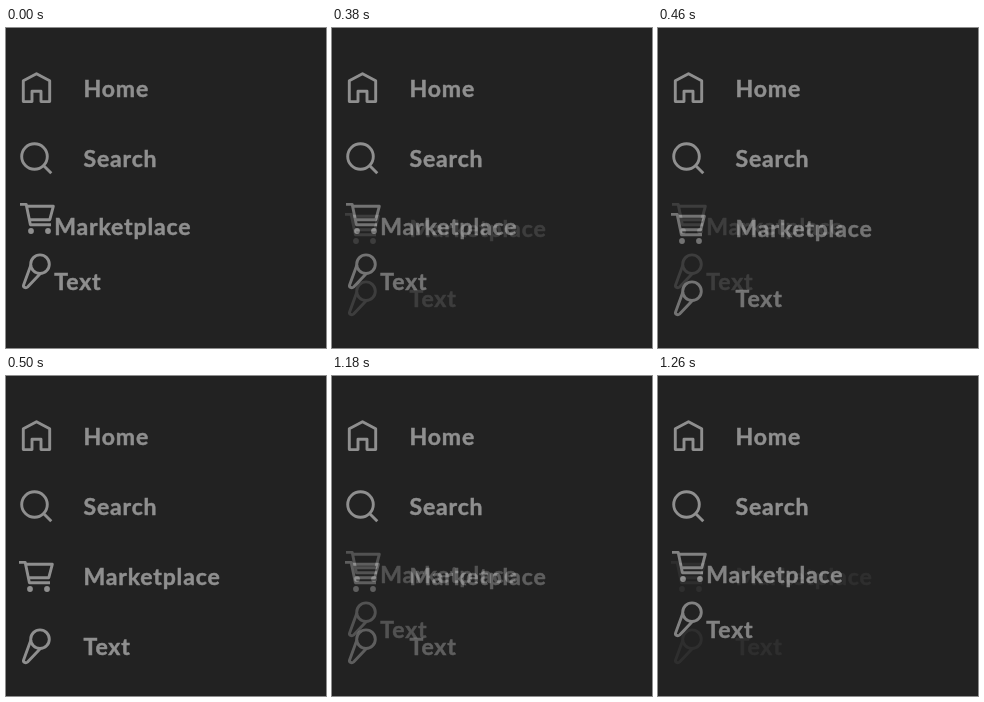
An HTML page that plays this animation: 320 by 320 pixels, repeating every 1280 ms.

```html
<!DOCTYPE html>
<html lang="en">
<head>
<meta charset="utf-8">
<title>Menu alignment</title>
<style>
  html, body { margin: 0; width: 100%; height: 100%; overflow: hidden; background: #222; }
  svg { display: block; width: 100vw; height: 100vh; }
  text { font: 700 23px Lato, sans-serif; letter-spacing: .85px; fill: #8f8f8f; stroke: #8f8f8f; stroke-width: .5; }
  .line { fill: none; stroke: #8f8f8f; stroke-width: 2.9; stroke-linejoin: round; }
  .dot { fill: #8f8f8f; }
</style>
</head>
<body>
<svg viewBox="0 0 320 320">
  <defs>
    <g id="cart">
      <path class="line" d="M0 1.4H6.2L10.4 21.8H31M7 3.3H33.3L29.8 16.7H9.4"/>
      <circle class="dot" cx="11" cy="28" r="2.9"/>
      <circle class="dot" cx="28" cy="28" r="2.9"/>
    </g>
    <g id="microphone" class="line">
      <circle cx="18" cy="10.2" r="9.3"/>
      <path d="M8.9 11L1.6 31Q1 32.6 2.6 33.4T5.6 33L18.4 19.4"/>
    </g>
  </defs>

  <path class="line" d="M17.3 73.6V52.8L30.5 45.7L43.7 52.8V73.6H35V63.2H26V73.6Z"/>
  <text x="77.5" y="69">Home</text>
  <g class="line">
    <circle cx="28.5" cy="128.5" r="12.8"/>
    <path d="M37.5 137.5L45.3 145.3"/>
  </g>
  <text x="77.5" y="139">Search</text>

  <g>
    <use href="#cart" x="14" y="175"/>
    <text x="48.3" y="207">Marketplace</text>
    <use href="#microphone" x="16" y="226"/>
    <text x="48.3" y="262">Text</text>
  </g>

  <!-- Opaque layer, so its opacity gives a true cross-fade -->
  <g id="aligned" opacity="0">
    <rect y="160" width="320" height="160" fill="#222"/>
    <use href="#cart" x="13" y="185"/>
    <text x="77.5" y="209">Marketplace</text>
    <use href="#microphone" x="16" y="253"/>
    <text x="77.5" y="279">Text</text>
  </g>
</svg>
<script>
  const LOOP = 1280, STEP = 20;
  const aligned = document.getElementById('aligned');

  const fade = (time, start, steps) =>
    Math.min(1, Math.max(0, (Math.floor((time - start) / STEP) + 1) / steps));

  function draw() {
    const time = performance.now() % LOOP;
    aligned.setAttribute('opacity', fade(time, 360, 8) - fade(time, 1120, 9));
    requestAnimationFrame(draw);
  }
  draw();
</script>
</body>
</html>
```
